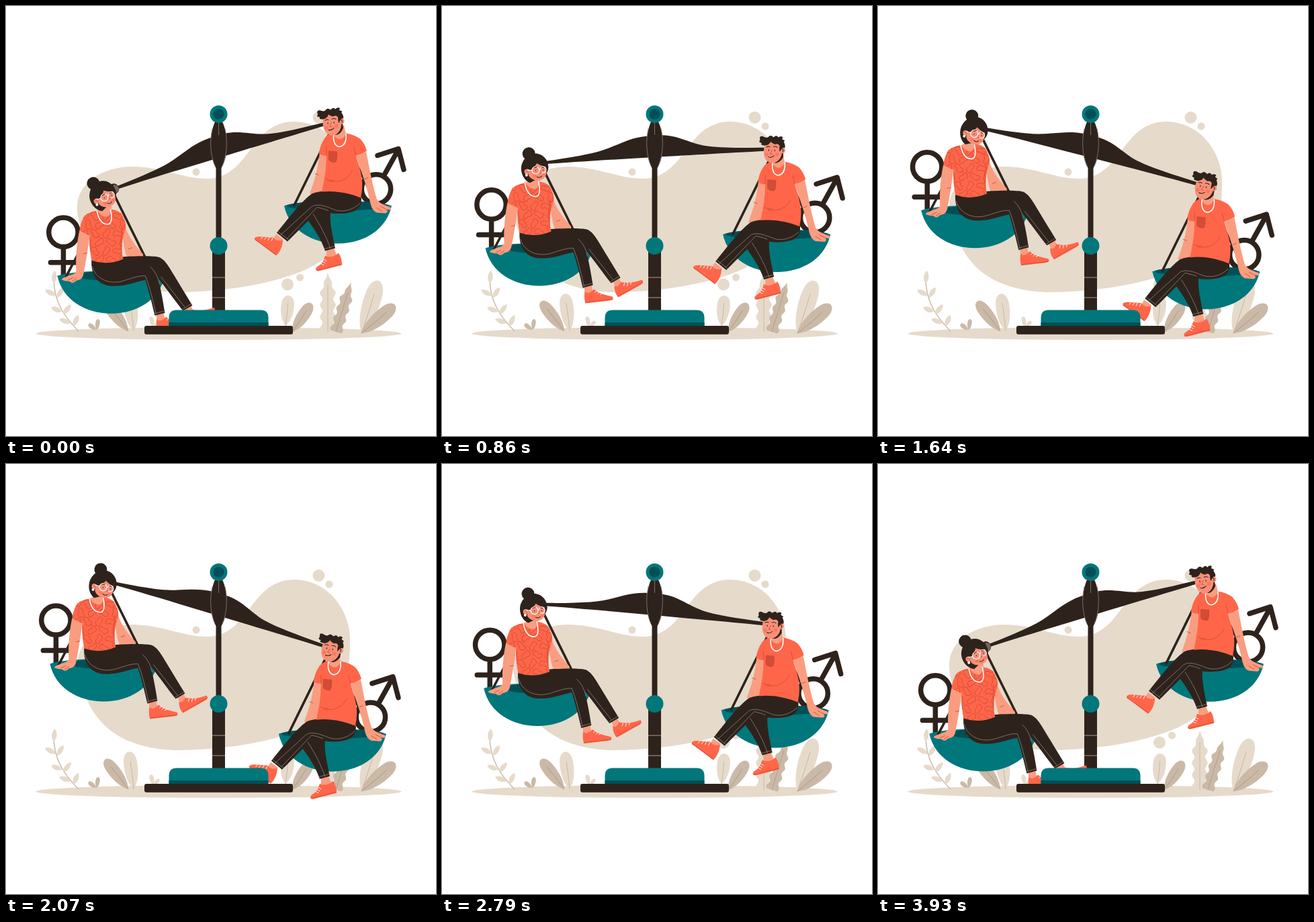
An HTML page for the animation above (4000 ms loop, 640x640 px).

```html
<!DOCTYPE html>
<html lang="en">
<head>
<meta charset="utf-8">
<title>Balance</title>
<style>
html, body { margin: 0; width: 100%; height: 100%; overflow: hidden; background: #fff; }
svg { display: block; width: 100vw; height: 100vh; }
.ink { fill: #2e231c; }
.teal { fill: #00777b; }
.deep { fill: #004f57; }
.sand { fill: #e6dacb; }
.skin { fill: #f99d80; }
.glow { fill: #f78f77; }
.red { fill: #ff6649; }
.rust { fill: #d24c36; }
.line { fill: none; stroke: #2e231c; stroke-linecap: round; stroke-linejoin: round; }
.seam { fill: none; stroke: #8d837b; stroke-width: .8; }
.fold { fill: none; stroke: #d24c36; stroke-width: .9; stroke-linecap: round; }
.white { fill: none; stroke: #fff; stroke-width: 1.6; stroke-linecap: round; }
.thin { stroke-width: .9; }
.sym { stroke-width: 7.5; }
.rope { stroke-width: 3.6; }
.face { stroke-width: 1; }
</style>
</head>
<body>
<svg viewBox="0 0 640 640">
  <defs>
    <path id="tee" d="M121 235C113 236 106 239 102 243C98 250 96 257 95 264Q102 270 110 271C109 285 111 298 113 309Q136 317 160 307C157 296 158 285 160 273L164 260C164 252 161 246 157 239Q151 234 143 233Q132 244 121 235Z"/>
    <clipPath id="teeClip"><use href="#tee"/></clipPath>
    <path id="bowl" d="M0 0C8 36 42 56 80 56S152 36 160 0C135-10 25-10 0 0Z"/>
  </defs>

  <ellipse class="sand" cx="316.5" cy="487.5" rx="272" ry="9.5"/>
  <path class="sand" d="M106 296C109 258 150 238 192 239C238 241 262 257 301 257C365 254 362 172 430 172C478 173 512 215 512 262C512 305 506 345 475 375C440 404 350 426 250 426C172 422 136 390 118 345C109 326 105 310 106 296Z"/>
  <g class="sand">
    <circle cx="465.5" cy="166" r="9"/><circle cx="481" cy="179" r="5.5"/>
    <circle cx="283" cy="247" r="5.5"/><circle cx="419" cy="414.5" r="9"/>
    <circle cx="437.5" cy="404" r="5.5"/>
  </g>
  <g id="plants"></g>

  <g id="beam">
    <path class="ink" d="M-172 17C-140 15-116 12-96 9C-62 4-42-11-12-12H12C38-10 52 3 78 8C105 13 140 14 176 16V20.500C120 20 50 20 0 20C-60 20-120 20-172 21Z"/>
    <circle class="ink" cx="-169" cy="19" r="8"/>
    <path d="M-168 13a6.500 6.500 0 0 1 0 13z" fill="#71675f"/>
  </g>
  <path class="ink" d="M312.5 235h8v120h-8zM307 366h19v88h-19z"/>
  <path d="M307 403h19v2h-19zM307 433h19v2h-19z" fill="#6b6058"/>
  <path class="ink" d="M316.5 166C323 168 329 190 329 206C329 224 322 244 316.5 244S304.5 224 304.5 206C304.5 190 310 168 316.5 166Z"/>
  <path class="seam" d="M316.5 174V192M326 182C330 200 329 222 322 238M307 182C303 200 304 222 311 238"/>
  <circle class="teal" cx="316.5" cy="161" r="13"/><circle class="deep" cx="316.5" cy="161" r="8"/>
  <circle class="teal" cx="316.5" cy="357" r="13"/>

  <g id="woman">
    <g class="line sym"><circle cx="71" cy="267" r="21.7"/><path d="M71 290V332M52 312H95"/></g>
    <g transform="translate(62 332)">
      <use href="#bowl" class="teal"/><ellipse class="deep" cx="92" rx="62" ry="8"/>
    </g>
    <path class="line rope" d="M143 205L75 333M145 208L193 305"/>
    <path class="skin" d="M157 257L164 261C168 273 177 286 190 300L186 305L166 305C160 290 160 275 157 257Z"/>
    <path class="fold" d="M168 292l5-2"/>
    <path class="skin" d="M209 389L220 387L222 396L216 402L210 399Z M252 382L261 377L265 385L257 393Z"/>
    <path class="red" d="M210 396C215 402 220 396 224 393C231 400 243 402 251 404C254 408 251 409 246 410L211 414C209 408 209 402 210 396Z"/>
    <path class="red" d="M254 388C259 391 262 386 263 382C272 385 285 383 295 379C298 382 296 385 292 387L260 405C256 401 254 396 254 388Z"/>
    <path class="fold" d="M211 412.5L251 408M260 403L296 383"/>
    <path class="white thin" d="M225 398l3-3M229 400l3-3M233 401l3-2M268 388l1-4M273 388l1-4M278 386l1-3"/>
    <path class="ink" d="M155 304C180 302 205 302 213 304C221 307 226 315 232 325L263 376L249 384C238 370 225 352 214 338Z"/>
    <path class="ink" d="M113 307C128 314 148 312 160 304C182 300 204 309 209 325C215 345 219 368 222 387L207 391C203 373 198 354 193 338C180 340 164 348 143 347C121 346 111 329 113 307Z"/>
    <path class="seam" d="M114 318C119 336 138 345 158 340C172 336 184 331 193 332C199 346 204 368 209 389M207 388L222 384M200 318Q211 328 214 344M216 333L252 379M248 382L262 373"/>
    <path class="skin" d="M126 222H142L143 234Q138 246 132 246Q126 245 121 235L127 232Z"/>
    <use href="#tee" class="red"/>
    <g id="print" class="fold" clip-path="url(#teeClip)"></g>
    <path class="fold" d="M158 260C158 274 156 286 157 295"/>
    <path class="skin" d="M122 235Q130 238 141 232Q143 241 136 244Q127 244 122 235Z"/>
    <path class="white" d="M121 236C123 249 130 256 138 255C144 253 143 242 141 233"/>
    <path class="skin" d="M95 264Q102 270 110 271C108 291 104 313 101 329C99 338 94 338 90 339Q87 343 83 342L80 340Q74 340 69 338Q68 336 71 335L78 332C83 330 87 330 90 325C89 304 91 282 95 264Z"/>
    <path class="fold" d="M101 299l5-1M78 338l7-3M84 340l6-4"/>
    <g id="wHead">
      <circle class="ink" cx="133.5" cy="191" r="9.5"/>
      <path class="ink" d="M128 234C118 228 116 213 121 204C127 194 135 191 142 192C153 193 161 204 159 216Q157 223 152 226L140 230Z"/>
      <path class="glow" d="M129 217C135 215 140 211 143 207Q148 212 155 214C156 222 154 230 147 232C139 234 130 230 128 223Z"/>
      <circle class="glow" cx="126.500" cy="217" r="4"/>
      <path class="fold" d="M125 216q3-1 3 3"/>
      <circle class="red" cx="137" cy="225" r="2.500" opacity=".55"/><circle class="red" cx="150" cy="226" r="2" opacity=".55"/>
      <path class="white" style="stroke-width:1.1" d="M128 215L134 216M134 217a5.500 5.500 0 1 0 11 0a5.500 5.500 0 1 0-11 0M145 217h1M146 218a4.500 4.500 0 1 0 9 0a4.500 4.500 0 1 0-9 0"/>
      <path class="line face" d="M139.500 217v1M150.500 218v1M138 213l4-1M149 214l3 1M140 227q4 3 7 0"/>
      <path class="fold" d="M146 218l1 4h-2"/>
      <circle cx="125" cy="222" r="2" fill="#fff"/>
    </g>
  </g>

  <g id="man">
    <g class="line sym"><circle cx="551" cy="272" r="21.7"/><path d="M563 251L583 215M553 222L584 212L592 243"/></g>
    <g transform="translate(414 297)">
      <use href="#bowl" class="teal"/><ellipse class="deep" cx="80" rx="76" ry="7"/>
    </g>
    <path class="line rope" d="M491 170L429 296M491 170L552 297"/>
    <path class="skin" d="M467 217L478 221C477 243 474 262 471 279H452C458 262 464 245 467 217Z"/>
    <path class="fold" d="M460 249l5 2"/>
    <path class="skin" d="M477 363L488 360L492 369L485 377L477 372Z M402 339L413 347L407 354L398 346Z"/>
    <path class="red" d="M371 344C376 341 389 344 398 344C401 349 407 350 412 348C412 358 407 367 402 371L374 350C370 348 369 346 371 344Z"/>
    <path class="red" d="M475 371C481 375 490 372 495 367C499 373 500 379 500 385L465 394C460 394 460 390 464 387C470 384 473 378 475 371Z"/>
    <path class="fold" d="M371 347L402 369.500M463 393L500 383.500"/>
    <path class="white thin" d="M380 346l2-3M385 347l2-3M390 348l2-4M395 349l2-4M469 383l4 2M471 380l4 2M473 377l4 2"/>
    <path class="ink" d="M449 305L485 298C479 312 486 340 490 360L475 364C469 346 458 330 447 315Z"/>
    <path class="ink" d="M455 279C470 272 510 274 528 279C531 293 527 303 515 306C497 311 480 308 465 304L419 350L403 337C420 316 438 292 455 279Z"/>
    <path class="seam" d="M408 341L453 300C460 292 475 297 487 302S514 305 527 293M418 346L463 299Q472 301 480 304M457 309C468 326 477 343 483 361M405 335L421 348M474 361L489 357"/>
    <path class="red" d="M487 188C481 190 476 193 474 197C469 204 467 212 466 219Q471 223 477 222C477 240 474 258 470 276Q498 273 528 285Q531 272 530 260C529 246 524 233 521 222Q530 221 537 215Q534 204 527 197Q518 191 507 189Z"/>
    <path class="rust" d="M480 215L493 216Q494 228 491 232Q486 234 480 229Z"/>
    <path class="fold" d="M481 260C499 264 510 255 515 245M476 257q6 3 12 2M518 210l3 12M477 209v13"/>
    <path class="skin" d="M488 184L503 177L506 190Q503 197 497 198Q490 197 487 189Z"/>
    <path class="white" d="M488 190C486 203 491 209 497 209C504 207 507 200 506 190"/>
    <path class="skin" d="M521 222Q530 221 536 216C540 235 545 265 552 287Q556 293 562 295L572 299Q575 303 571 303L566 302Q570 306 565 308L552 307C545 304 543 297 541 287C536 265 529 247 521 222Z"/>
    <path class="fold" d="M534 257l5-2M558 298l8 4M552 300l8 5"/>
    <g id="mHead">
      <path class="ink" d="M489 191Q497 193 502 181L500 168L484 164Z"/>
      <path class="glow" d="M472 166C470 177 474 191 484 192C492 193 498 186 499 178L499 163L487 158Z"/>
      <circle class="glow" cx="499" cy="171" r="4.500"/>
      <path class="line face" d="M498 169q3 0 2 4M479 173v2M488 172v2M475 170q2-2 5-1M485 168q3-2 6 0M480 184q5 1 8-3"/>
      <path class="fold" d="M484 173l-2 6h3"/>
      <circle class="red" cx="477" cy="181" r="2.800" opacity=".55"/><circle class="red" cx="492" cy="178" r="2.800" opacity=".55"/>
      <path class="ink" d="M472 168Q465 169 467 165Q461 165 464 161Q461 155 467 155Q473 157 475 155Q478 150 483 154Q487 149 490 153Q494 149 497 152Q495 154 497 155Q502 156 499 158Q503 163 502 167Q499 166 497 170Q496 174 495 173Q494 169 494 165Q491 161 487 164Q482 163 480 161Q478 167 472 168Z"/>
    </g>
  </g>

  <path class="teal" d="M242.500 476V464Q242.500 452.500 254 452.500H379Q390.500 452.500 390.500 464V476Z"/>
  <path class="deep" d="M242.500 471H390.500V476.500H242.500Z"/>
  <rect class="ink" x="206" y="476" width="221" height="12.800" rx="3"/>
</svg>
<script>
const $ = id => document.getElementById(id);
const LIGHT = '#e6dacb', DARK = '#cbb9a7', VEIN = '#b3a08e';

// Rounded leaf growing from (x, y) at an angle from vertical
function leaf(x, y, len, w, deg, color, vein) {
  const h = w / 2;
  return `<g transform="translate(${x} ${y}) rotate(${deg})">
    <path fill="${color}" d="M0 0C${-h} ${-len * .2} ${-h * 1.2} ${-len * .55} ${-h} ${-len * .8}C${-h * .7} ${-len * 1.07} ${h * .7} ${-len * 1.07} ${h} ${-len * .8}C${h * 1.2} ${-len * .55} ${h} ${-len * .2} 0 0Z"/>
    ${vein ? `<path d="M0 0Q1 ${-len * .4} 0 ${-len * .75}" fill="none" stroke="${vein}" stroke-width="1"/>` : ''}</g>`;
}

function sprout(x, y, len, w, deg) {
  return `<path transform="translate(${x} ${y}) rotate(${deg})" fill="${LIGHT}"
    d="M0 0C${-w} ${-len * .35} ${-w * .6} ${-len * .8} 0 ${-len}C${w * .6} ${-len * .8} ${w} ${-len * .35} 0 0Z"/>`;
}

// Frond with wavy edges
function frond(x, y, len, w, deg, color, vein) {
  const side = s => Array.from({ length: 45 }, (_, i) => {
    const u = i / 44;
    const r = w / 2 * Math.min(1, (1 - u) * 3.2) * (.82 + .16 * Math.sin(u * 31));
    return `${(s * r).toFixed(1)} ${(-u * len).toFixed(1)}`;
  });
  return `<g transform="translate(${x} ${y}) rotate(${deg})">
    <path fill="${color}" d="M${[...side(-1), ...side(1).reverse()].join('L')}Z"/>
    <path d="M0 0V${-len * .8}" stroke="${vein}" stroke-width="1"/></g>`;
}

$('plants').innerHTML =
  `<path d="M108 484C86 462 72 440 71 408" fill="none" stroke="${DARK}" stroke-width="1.5"/>` +
  sprout(71, 413, 19, 6, 5) + sprout(74, 431, 18, 6, -62) + sprout(76, 434, 18, 6, 32) +
  sprout(83, 455, 17, 6, -68) + sprout(85, 459, 19, 6, 38) +
  sprout(96, 472, 18, 6, -70) + sprout(100, 477, 19, 6, 25) +
  leaf(134, 482, 14, 6, -52, DARK) + leaf(135, 482, 16, 6, 8, DARK) +
  leaf(182, 484, 56, 17, -38, DARK, VEIN) + leaf(190, 484, 56, 19, -7, LIGHT, DARK) +
  leaf(219, 478, 16, 6, -12, LIGHT) + leaf(220, 478, 12, 5, 42, LIGHT) +
  leaf(416, 476, 45, 18, 6, LIGHT, DARK) + leaf(426, 485, 51, 17, 34, DARK, VEIN) +
  frond(479, 485, 88, 24, 0, LIGHT, DARK) + frond(491, 485, 77, 20, 17, DARK, VEIN) +
  leaf(529, 487, 82, 24, 18, LIGHT, DARK) + leaf(529, 487, 65, 20, 50, DARK, VEIN);

let curls = '';
for (let i = 0; i < 24; i++) {
  const row = Math.floor(i / 4), x = 101 + i % 4 * 17 + row % 2 * 7, y = 243 + row * 13;
  curls += `<path transform="translate(${x} ${y}) rotate(${i * 67})" d="M-6-1C-5-6 0-3 2-3C6-6 9-1 6 2C3 5 0 1-2 4C-5 7-8 3-6-1Z"/>`;
}
$('print').innerHTML = curls;

const LOOP = 4000, STEP = LOOP / 56, ARM = 180, SWING = 16.9;
const put = (id, value) => $(id).setAttribute('transform', value);

function draw(ms) {
  const t = Math.floor((ms % LOOP + 5) / STEP) * STEP;
  const phase = t / LOOP * 2 * Math.PI;
  const deg = -SWING * Math.cos(phase + .028);
  const a = deg * Math.PI / 180, c = Math.cos(a), s = Math.sin(a);
  const nod = -Math.cos(phase + .23);

  // Each pan hangs level from its end of the beam
  const hang = (id, x, y, arm, drop) =>
    put(id, `translate(${x + arm * c - drop * s} ${y + arm * s + drop * c})`);

  put('beam', `translate(316.5 205) rotate(${deg})`);
  hang('woman', 181.2, -.6, -ARM, 18.8);
  hang('man', -176.4, 39.2, ARM, 14.2);
  put('wHead', `rotate(${16 * nod - 9.5} 132 233)`);
  put('mHead', `rotate(${9 * (nod + 1)} 496 193)`);
}

const start = performance.now();
(function tick() {
  draw(performance.now() - start);
  requestAnimationFrame(tick);
})();
</script>
</body>
</html>
```
